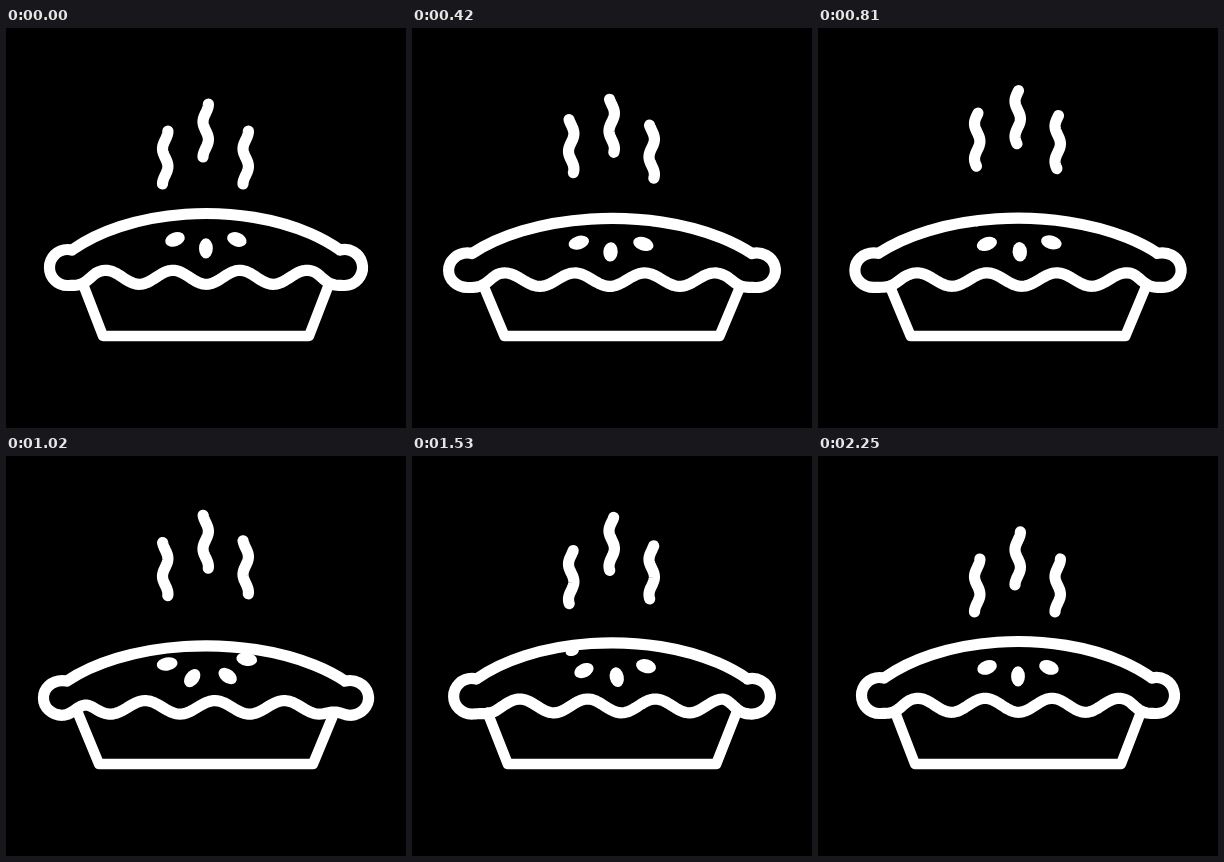
An HTML page with a canvas that plays this animation: 400 by 400 pixels, repeating every 2280 ms.

```html
<!DOCTYPE html>
<html lang="en">
<head>
<meta charset="utf-8">
<title>Pie</title>
<style>
  html, body { margin: 0; width: 100%; height: 100%; overflow: hidden; background: #000; }
  canvas { display: block; width: 100vmin; height: 100vmin; }
</style>
</head>
<body>
<canvas id="stage" width="400" height="400"></canvas>
<script>
const LOOP = 2280;
const TAU = Math.PI * 2;
const ctx = document.getElementById('stage').getContext('2d');

// Smooth monotone curve through [time, value] pairs.
function curve(points) {
  const n = points.length;
  const secant = i => (points[i + 1][1] - points[i][1]) / (points[i + 1][0] - points[i][0]);
  const slope = points.map((_, i) => {
    if (i === 0) return secant(0);
    if (i === n - 1) return 0;
    const a = secant(i - 1), b = secant(i);
    return a * b > 0 ? 2 * a * b / (a + b) : 0;
  });
  return t => {
    let i = 0;
    while (i < n - 2 && t >= points[i + 1][0]) i++;
    const [t0, v0] = points[i], [t1, v1] = points[i + 1];
    const h = t1 - t0, s = (t - t0) / h, r = 1 - s;
    return v0 * (1 + 2 * s) * r * r + slope[i] * h * s * r * r
         + v1 * s * s * (3 - 2 * s) - slope[i + 1] * h * s * s * r;
  };
}

// Turns left to go before everything settles.
const crustTurns = curve([[0, 3], [240, 2.39], [600, 1.55], [1020, .62], [1290, .28], [1770, .05], [LOOP, 0]]);
const steamTurns = curve([[0, 4], [240, 3.17], [600, 2.04], [1020, .55], [1290, .26], [1770, .04], [LOOP, 0]]);
const squash = curve([[0, 0], [240, .95], [420, 1], [600, 1], [1020, .88], [1290, .62], [1650, .12], [1770, .03], [LOOP, 0]]);

// x, resting top, rise, time of the highest point
const STEAM = [
  [159.2, 103, 18, 720],
  [199.7, 76, 18, 1230],
  [239.7, 103, 18.5, 1110]
];

function drawSteam(t) {
  const turns = steamTurns(t);
  for (const [x, rest, rise, peak] of STEAM) {
    const part = t < peak ? t / peak : (LOOP - t) / (LOOP - peak);
    const top = rest - rise * (1 - Math.cos(Math.PI * part)) / 2;
    ctx.beginPath();
    for (let d = 0; d <= 53; d++) {
      ctx.lineTo(x + 2.7 * Math.cos(TAU * (d / 35.3 + turns)), top + d);
    }
    ctx.stroke();
  }
}

// Builds a path in squashed space; the line weight stays even.
function squashed(k, build) {
  ctx.save();
  ctx.translate(200, 308);
  ctx.scale(1 + .044 * k, 1 - .04 * k);
  ctx.translate(-200, -308);
  ctx.beginPath();
  build();
  ctx.restore();
}

function drawPan(k) {
  squashed(k, () => {
    ctx.moveTo(77, 256);
    ctx.lineTo(97, 308);
    ctx.lineTo(303, 308);
    ctx.lineTo(323, 256);
  });
  ctx.stroke();
}

// Height of the crust's lower edge; the ripple fades out towards the rims.
function ripple(x, crest) {
  const s = Math.min(1, (138.5 - Math.abs(x - 200)) / 30);
  const fade = s * s * (3 - 2 * s);
  return 257.5 - fade * (8.2 + 7 * Math.cos(TAU * (x - crest) / 67));
}

function drawCrust(k, turns) {
  const crest = 167 + 67 * turns;
  squashed(k, () => {
    const lean = Math.asin(134 / 170);
    ctx.ellipse(200, 280.5, 170, 95, 0, -Math.PI / 2 - lean, -Math.PI / 2 + lean);
    ctx.arc(338.5, 239.5, 18, -1.83, Math.PI / 2);
    for (let x = 337; x >= 63; x -= 2) ctx.lineTo(x, ripple(x, crest));
    ctx.arc(61.5, 239.5, 18, Math.PI / 2, -1.31);
    ctx.closePath();
  });
  ctx.stroke();
}

function drawSeeds(k, turns) {
  const shift = turns % 1;
  for (let i = -2; i <= 1; i++) {
    const u = i + shift;
    const size = Math.min(1, Math.max(0, (2 - Math.abs(u)) / .2));
    if (!size) continue;
    const tilt = -1.4 * Math.sin(1.05 * u);
    const x = 200 + 39.5 * Math.sin(.9 * u);
    const y = 196.7 + 23.7 * Math.cos(.9 * u);
    squashed(k, () => ctx.ellipse(x, y, 6.9 * size, 10.1 * size, tilt, 0, TAU));
    ctx.fill();
  }
}

function draw(t) {
  const k = squash(t), turns = crustTurns(t);
  ctx.fillStyle = '#000';
  ctx.fillRect(0, 0, 400, 400);
  ctx.fillStyle = ctx.strokeStyle = '#fff';
  ctx.lineCap = ctx.lineJoin = 'round';
  ctx.lineWidth = 10.4;
  drawPan(k);
  ctx.lineWidth = 11.2;
  drawSteam(t);
  drawCrust(k, turns);
  drawSeeds(k, turns);
}

const start = performance.now();
function tick() {
  draw((performance.now() - start) % LOOP);
  requestAnimationFrame(tick);
}
tick();
</script>
</body>
</html>
```
